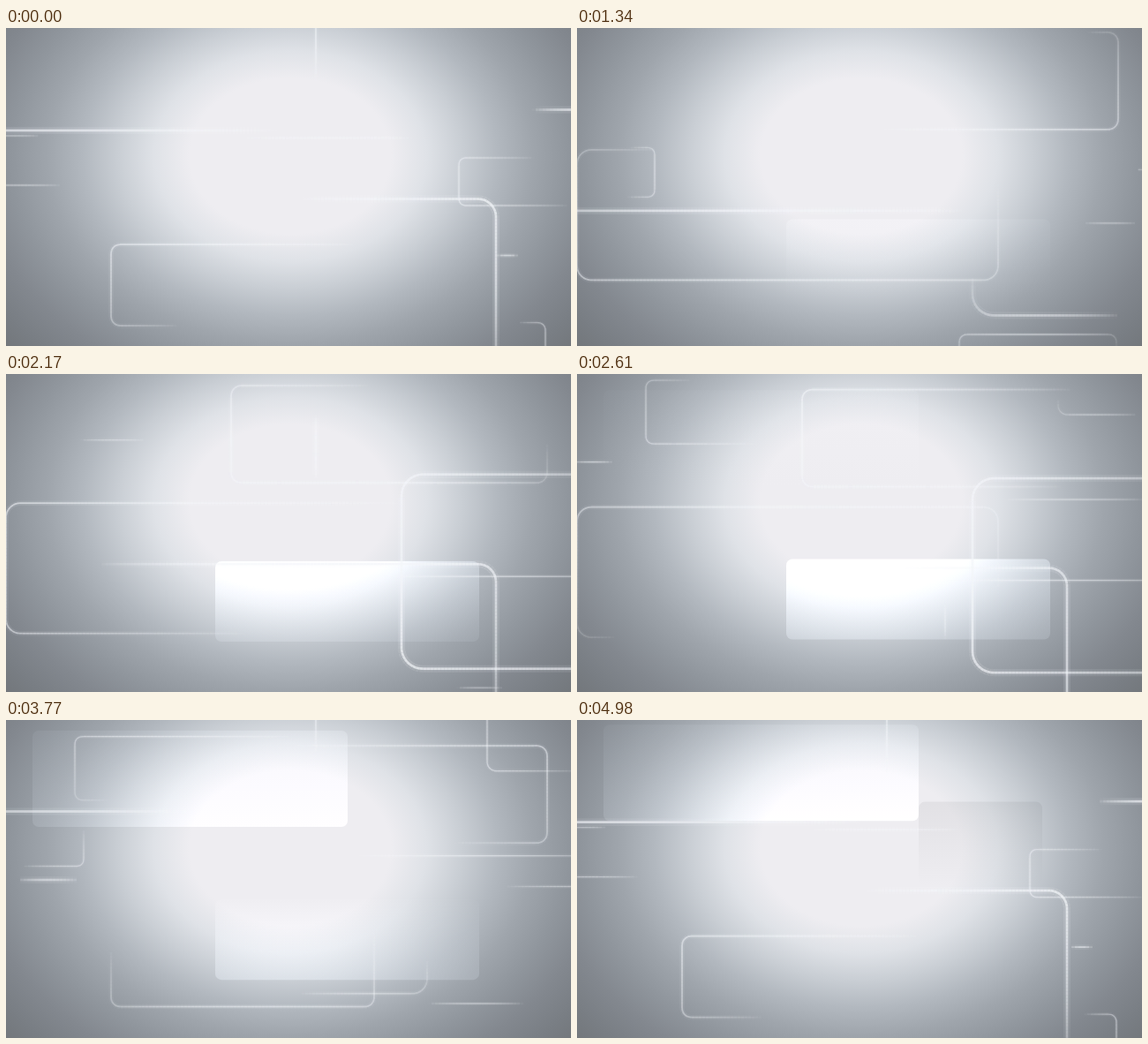
Animation of 640 by 360 pixels, one loop 5.02 s. Source, as an HTML page with a canvas:

```html
<!DOCTYPE html>
<html>
<head>
<meta charset="utf-8">
<style>
html, body { margin: 0; width: 100%; height: 100%; overflow: hidden; background: #8f959c; }
canvas { display: block; width: 640px; height: 360px; }
</style>
</head>
<body>
<canvas id="stage" width="640" height="360"></canvas>
<script>
const LOOP = 5.02;   // seconds
const DRIFT = 10;    // lines sink, px per second
const RISE = 5.5;    // panels climb, px per second
const STEP = 4;
const FINE = 1.4, MEDIUM = 1.8, BOLD = 2.7;
const ctx = document.getElementById('stage').getContext('2d');
const pulses = [];

const mix = (a, b, u) => a + (b - a) * u;
const progress = (t, [from, to]) => (t - from) / (to - from);
const swell = u => u > 0 && u < 1 ? Math.sin(Math.PI * u) : 0;

// Rounded polyline sampled at even steps.
function route(corners, radius = 0, closed = false) {
  const n = corners.length;
  const toward = (a, b, d) => {
    const k = d / Math.hypot(b[0] - a[0], b[1] - a[1]);
    return [mix(a[0], b[0], k), mix(a[1], b[1], k)];
  };
  let d = 'M' + (closed ? toward(corners[0], corners[1], radius) : corners[0]);
  const last = closed ? n : n - 2;
  for (let i = 1; i <= last; i++) {
    const p = corners[i % n], c = radius * 0.45;
    const before = corners[i - 1], after = corners[(i + 1) % n];
    d += 'L' + toward(p, before, radius) + 'C' + toward(p, before, c) + ' ' +
      toward(p, after, c) + ' ' + toward(p, after, radius);
  }
  if (!closed) d += 'L' + corners[n - 1];
  const path = document.createElementNS('http://www.w3.org/2000/svg', 'path');
  path.setAttribute('d', d);
  const length = path.getTotalLength();
  const count = Math.round(length / STEP);
  const points = Array.from({ length: count + 1 }, (_, i) => {
    const p = path.getPointAtLength(length * i / count);
    return [p.x, p.y];
  });
  return { points, count, closed };
}
const box = (x1, y1, x2, y2, r) => route([[x1, y1], [x2, y1], [x2, y2], [x1, y2]], r, true);
const row = (x1, x2, y) => route([[x1, y], [x2, y]]);
const column = (x, y1, y2) => route([[x, y1], [x, y2]]);

// A streak lives from life[0] to life[1] while its centre travels along the route;
// it grows to its full span in mid-life and shrinks again.
function pulse(path, width, life, travel, span, pace = 1) {
  pulses.push({ path, width, life, travel, span, pace });
}

pulse(box(0, 124.5, 477, 272, 16), MEDIUM, [-.3, 4.05], [229, 1982], 870);
pulse(box(119, 245, 417, 337, 10), MEDIUM, [-2.5, 1.2], [340, 1190], 510, 1.5);
pulse(box(255, -8.5, 613, 101.5, 11), MEDIUM, [.5, 4.85], [340, 1580], 700, 1.2);

const bend = route([[0, 193.5], [555, 193.5], [555, 420]], 20);
pulse(bend, BOLD, [-1.4, 1.6], [-300, 850], 430, .4);
pulse(bend, BOLD, [.55, 3.3], [-20, 900], 700, 1.3);

pulse(route([[720, 312], [448, 312], [448, 92], [720, 92]], 24), BOLD, [1.2, 3.4], [190, 440], 1000);
pulse(row(560, 720, 92.5), BOLD, [-.5, .3], [60, 120], 130);

const across = row(-300, 760, 116);
pulse(across, BOLD, [-1.6, .6], [340, 345], 700);
pulse(across, MEDIUM, [.4, 1.3], [780, 980], 190);
pulse(across, FINE, [2.3, 4.4], [870, 830], 350);
pulse(row(420, 700, 207.5), FINE, [1.2, 3.5], [190, 95], 310);

const corner = route([[433, 380], [433, 333.5], [611, 333.5], [611, 400]], 8);
pulse(corner, FINE, [-1.9, .5], [95, 270], 140);
pulse(corner, FINE, [.4, 2.3], [78, 152], 240);

pulse(route([[720, 201], [513, 201], [513, 147], [720, 147]], 7), FINE, [-1.8, 1.4], [50, 390], 260, 1.3);

const hook = route([[0, 122], [88, 122], [88, 178], [-60, 178]], 7);
pulse(hook, FINE, [-1.7, .4], [130, 230], 170);
pulse(hook, FINE, [-.3, 2], [5, 205], 135, 1.8);

pulse(route([[300, 53], [78, 53], [78, -19], [320, -19]], 8), FINE, [2, 4.8], [170, 510], 380, 1.3);
pulse(route([[545, -80], [545, 20], [700, 20]], 10), FINE, [2.3, 4.7], [150, 30], 260);

const drop = column(351, -100, 200);
pulse(drop, MEDIUM, [-1.8, .6], [100, 110], 150);
pulse(drop, BOLD, [1.2, 2.3], [20, 180], 200);
pulse(column(317, -100, 100), MEDIUM, [1.4, 2.1], [40, 140], 150);
pulse(row(0, 60, 73.5), FINE, [2.2, 3], [5, 30], 45);
pulse(row(540, 600, 257.5), MEDIUM, [-.3, .2], [55, 10], 24);

function drawPulse({ path, width, life, travel, span, pace }, time) {
  const age = progress(time, life);
  const size = swell(age);
  if (!size) return;
  const { points, count, closed } = path;
  const length = span * size;
  const tail = mix(...travel, age ** pace) - length / 2;
  const light = (.3 + .2 * width) * (.6 + .4 * size);
  ctx.save();
  ctx.translate(0, DRIFT * time);
  for (let i = Math.floor(tail / STEP); i < (tail + length) / STEP; i++) {
    if (!closed && (i < 0 || i >= count)) continue;
    const j = (i % count + count) % count;
    const glow = light * swell(((i + .5) * STEP - tail) / length) ** .65;
    ctx.beginPath();
    ctx.moveTo(...points[j]);
    ctx.lineTo(...points[j + 1]);
    ctx.globalAlpha = glow * .14;
    ctx.lineWidth = width * 3;
    ctx.stroke();
    ctx.globalAlpha = glow * .85;
    ctx.lineWidth = width;
    ctx.stroke();
  }
  ctx.restore();
}

const backdrop = ctx.createRadialGradient(0, 0, 88, 0, 0, 335);
['#eeedf1', '#dfe2e7', '#c9ced4', '#b2b8bf', '#9fa5ac', '#90969d', '#83888f', '#797e84', '#717579']
  .forEach((color, i, all) => backdrop.addColorStop(i / (all.length - 1), color));

function drawBackdrop() {
  ctx.save();
  ctx.translate(322, 145);
  ctx.scale(1.3, 1);
  ctx.fillStyle = backdrop;
  ctx.fillRect(-300, -150, 600, 400);
  ctx.restore();
}

// The top and bottom edges of a panel brighten or darken on their own schedule.
const panels = [
  { x: 237, y: 223.9, w: 299, h: 91, mode: 'color-dodge',
    top: { life: [1.2, 3.8], peak: .12 }, bottom: { life: [1.7, 4.7], peak: .1 } },
  { x: 30, y: 32.7, w: 357, h: 109, mode: 'color-dodge',
    top: { life: [2.3, 6], peak: .04 }, bottom: { life: [2.6, 6.2], peak: .08 } },
  { x: 387, y: 120, w: 140, h: 95, mode: 'multiply',
    top: { life: [3.9, 6], peak: .05 }, bottom: { life: [3.9, 6], peak: 0 } }
];

function drawPanel({ x, y, w, h, mode, top, bottom }, time) {
  const edge = y - RISE * time;
  const fill = ctx.createLinearGradient(0, edge, 0, edge + h);
  [top, bottom].forEach(({ life, peak }, i) => {
    const strength = peak * swell(progress(time, life));
    const v = 255 * (mode === 'multiply' ? 1 - strength : strength);
    fill.addColorStop(i, `rgb(${v} ${v} ${v})`);
  });
  ctx.save();
  ctx.globalCompositeOperation = mode;
  ctx.fillStyle = fill;
  ctx.beginPath();
  ctx.roundRect(x, edge, w, h, 7);
  ctx.fill();
  ctx.restore();
}

function draw(time) {
  drawBackdrop();
  panels.forEach(p => drawPanel(p, time));
  ctx.strokeStyle = '#f4f6fa';
  for (const p of pulses) {
    drawPulse(p, time);
    drawPulse(p, time - LOOP);
  }
}

const start = performance.now();
function tick() {
  draw((performance.now() - start) / 1000 % LOOP);
  requestAnimationFrame(tick);
}
tick();
</script>
</body>
</html>
```
